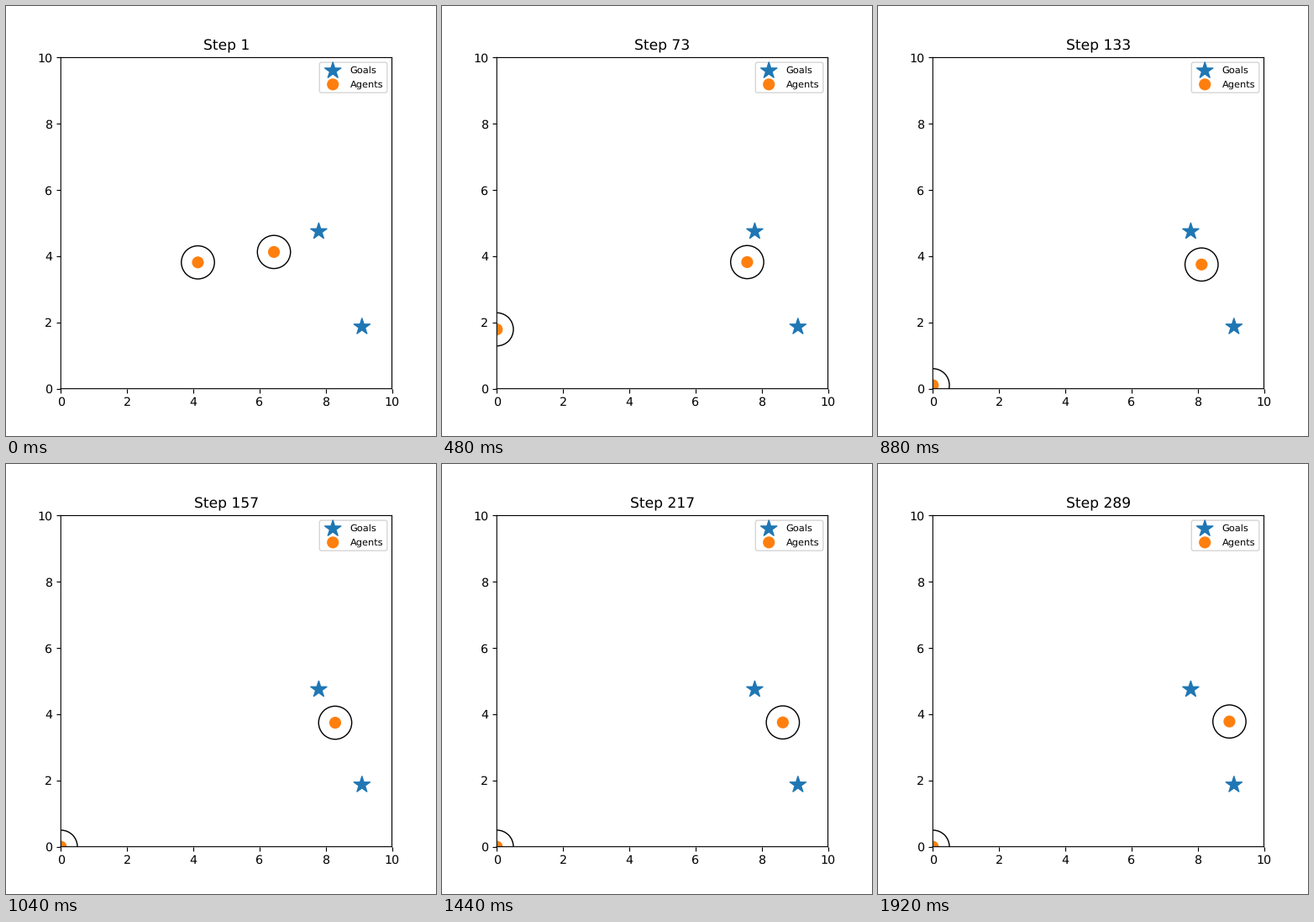
These frames come from a looping animation (512 by 512 pixels, 2 s). A matplotlib script:

```python
import numpy as np
import matplotlib.pyplot as plt
from matplotlib.animation import FuncAnimation

FRAMES = 25
INTERVAL = 80
STEPS_PER_FRAME = 12
RADIUS = 0.5

# Sub-pixel rendering: no snapped lines, no hinted glyphs.
plt.rcParams.update({"path.snap": False, "text.hinting": "none"})

GOALS = np.array([[7.79, 4.75], [9.095, 1.87]])

# Left agent: constant velocity, stopped by the walls.
START = np.array([4.14, 3.815])
VELOCITY = np.array([-0.827, -0.3372])

# Right agent: smooth curve through a few waypoints.
KNOTS = [0, 3, 6, 11, 15, 18, 24]
CURVE_X = np.polyfit(KNOTS, [6.436, 7.085, 7.56, 8.118, 8.437, 8.638, 8.958], 4)
CURVE_Y = np.polyfit(KNOTS, [4.13, 3.935, 3.825, 3.75, 3.746, 3.753, 3.781], 4)


def positions(i):
    left = np.clip(START + VELOCITY * i, 0, 10)
    right = np.polyval(CURVE_X, i), np.polyval(CURVE_Y, i)
    return np.array([left, right])


def markers(points, color, **style):
    # One colour per point keeps marker positions unrounded.
    return ax.scatter(*points.T, color=[color] * len(points), **style)


fig, ax = plt.subplots(figsize=(5, 5), dpi=102.4)
fig.subplots_adjust(left=0.125, right=0.9, bottom=0.11, top=0.88)
ax.set(xlim=(0, 10), ylim=(0, 10), aspect="equal")
ax.set_xticks(range(0, 11, 2))
ax.set_yticks(range(0, 11, 2))

markers(GOALS, "C0", marker="*", s=200, label="Goals")
agents = markers(positions(0), "C1", s=80, label="Agents")
rings = [ax.add_patch(plt.Circle(p, RADIUS, fill=False)) for p in positions(0)]
title = ax.set_title("Step 1")
ax.legend(loc="upper right", fontsize=8)


def update(i):
    points = positions(i)
    agents.set_offsets(points)
    for ring, point in zip(rings, points):
        ring.center = tuple(point)
    title.set_text(f"Step {1 + STEPS_PER_FRAME * i}")
    return [agents, title, *rings]


anim = FuncAnimation(fig, update, frames=FRAMES, interval=INTERVAL,
                     repeat=True, repeat_delay=0, blit=False)
plt.show()
```
